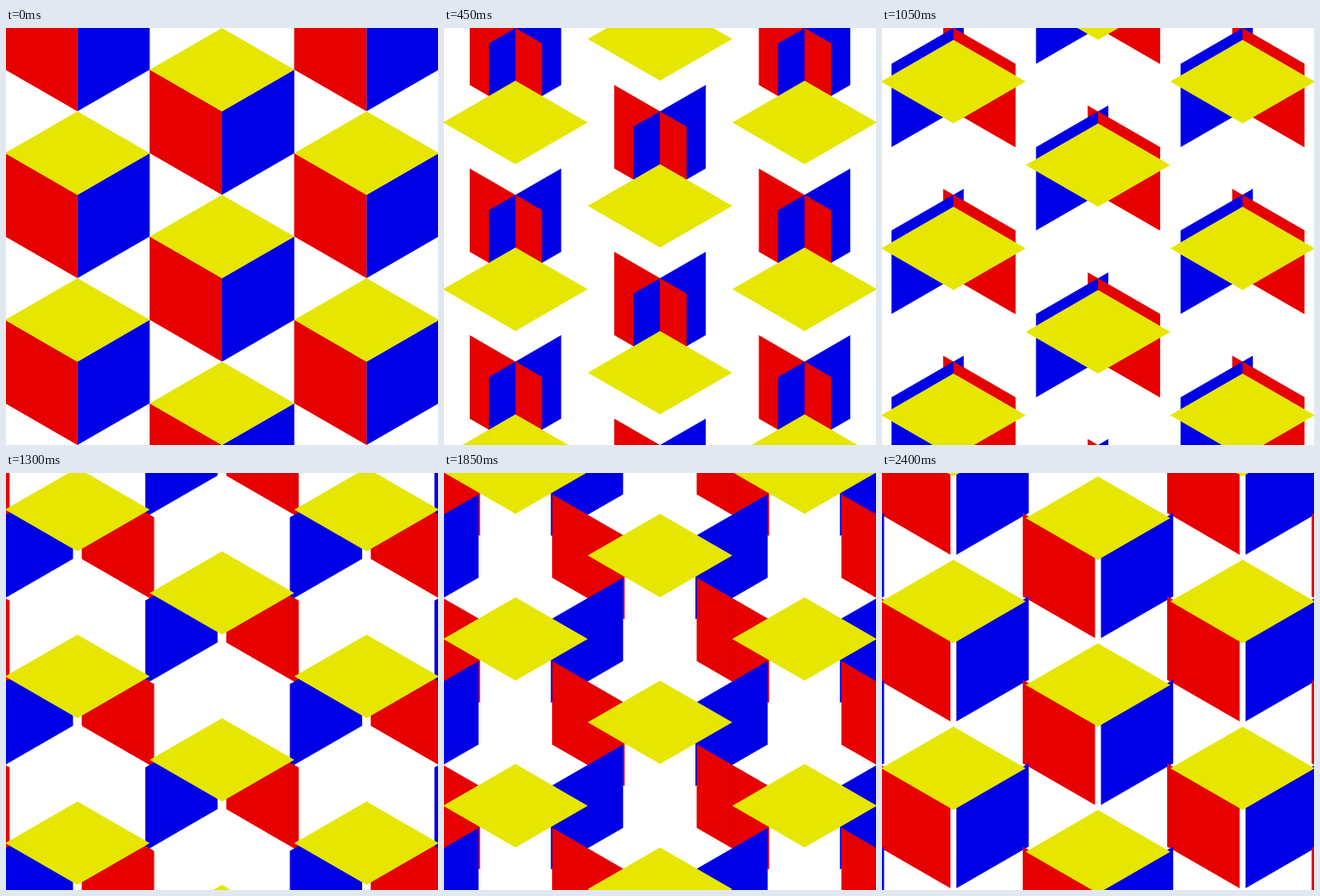
An HTML page with a canvas for the animation above (2.45 s loop, 500x483 px).

```html
<!DOCTYPE html>
<html lang="en">
<head>
<meta charset="utf-8">
<title>Sliding cube faces</title>
<style>
  html, body { margin: 0; width: 100%; height: 100%; overflow: hidden; background: #fff; }
  canvas { display: block; }
</style>
</head>
<body>
<canvas id="stage" width="500" height="483"></canvas>
<script>
const ctx = document.getElementById('stage').getContext('2d');
const WIDTH = 500, HEIGHT = 483;
const STEP = 50, STEPS = 49;
const SIDE = HEIGHT / 5;
const HALF = SIDE * Math.sqrt(3) / 2;
const RED = '#e60000', BLUE = '#0000e6', YELLOW = '#e6e600';

// Corners relative to the front top corner of a cube.
const LEFT_FACE = [[-HALF, -SIDE / 2], [0, 0], [0, SIDE], [-HALF, SIDE / 2]];
const RIGHT_FACE = LEFT_FACE.map(([x, y]) => [-x, y]);
const TOP_FACE = [[0, -SIDE], [HALF, -SIDE / 2], [0, 0], [-HALF, -SIDE / 2]];

const columnX = col => WIDTH / 2 + col * 2 * HALF;

function drawFaces(face, color, dx, dy) {
  ctx.fillStyle = color;
  ctx.beginPath();
  for (let col = -4; col <= 4; col++) {
    const offset = col % 2 ? 0 : SIDE;
    for (let row = -3; row <= 4; row++) {
      const x = columnX(col) + dx;
      const y = offset + row * 2 * SIDE + dy;
      face.forEach(([px, py], i) => ctx[i ? 'lineTo' : 'moveTo'](x + px, y + py));
      ctx.closePath();
    }
  }
  ctx.fill();
}

function draw(progress) {
  const dx = progress * 2 * HALF;
  const dy = progress * SIDE;
  ctx.fillStyle = '#fff';
  ctx.fillRect(0, 0, WIDTH, HEIGHT);

  drawFaces(LEFT_FACE, RED, dx, dy);
  drawFaces(RIGHT_FACE, BLUE, -dx, dy);

  // Red lies in front on the right half of every column.
  ctx.save();
  ctx.beginPath();
  for (let col = -2; col <= 2; col++) ctx.rect(columnX(col), 0, HALF, HEIGHT);
  ctx.clip();
  drawFaces(LEFT_FACE, RED, dx, dy);
  ctx.restore();

  drawFaces(TOP_FACE, YELLOW, 0, -2 * dy);
}

const start = performance.now();
function tick() {
  const step = Math.floor((performance.now() - start) / STEP) % STEPS;
  draw(step / STEPS);
  requestAnimationFrame(tick);
}
tick();
</script>
</body>
</html>
```
